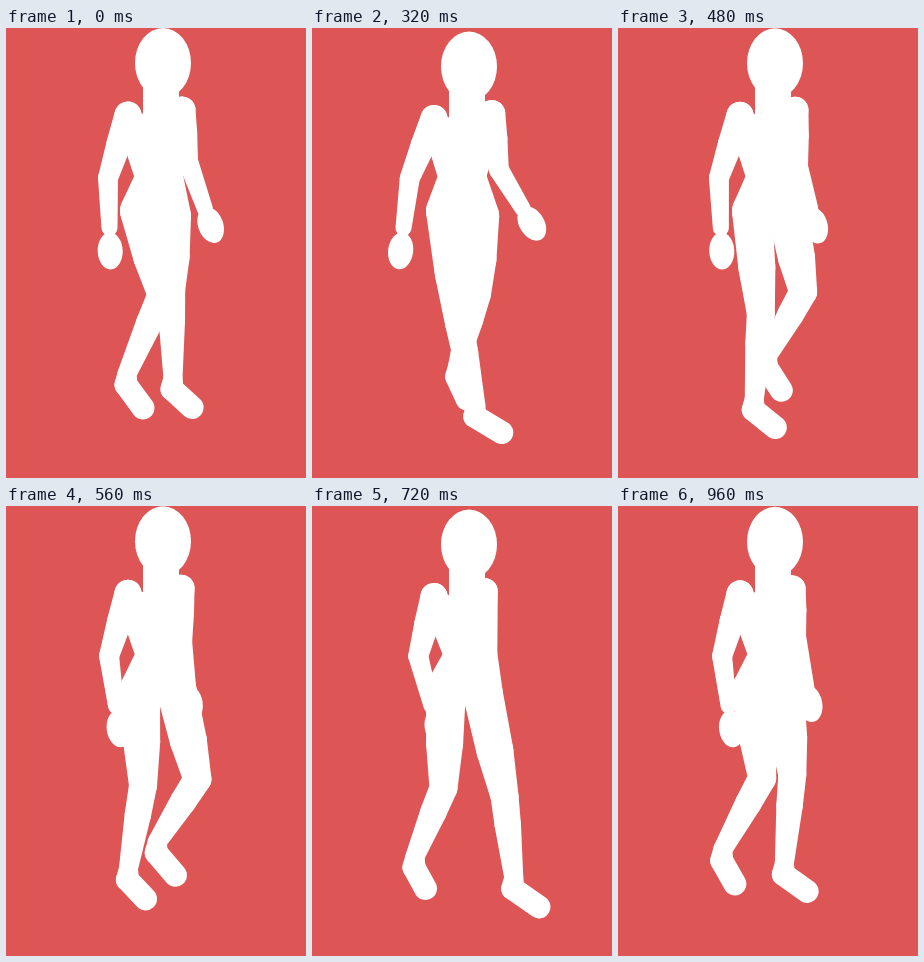
Animation of 300x450 px, one loop 1.04 s. Source, as an HTML page with a canvas:

```html
<!DOCTYPE html>
<html lang="en">
<head>
<meta charset="utf-8">
<title>Walk cycle</title>
<style>
  html, body { margin: 0; width: 100%; height: 100%; overflow: hidden; background: #de5555; }
  canvas { display: block; width: 300px; height: 450px; }
</style>
</head>
<body>
<canvas id="stage" width="300" height="450"></canvas>
<script>
const LOOP = 1040, STEP = 80;
const ctx = document.getElementById('stage').getContext('2d');

const mix = (a, b, u) => a.map((v, i) => v + (b[i] - v) * u);
const along = ([x, y], angle, len) => [x + len * Math.cos(angle), y + len * Math.sin(angle)];
const angleTo = (a, b) => Math.atan2(b[1] - a[1], b[0] - a[0]);

// Every joint sways around a mean place; waves are cosine and sine parts per harmonic.
// L and R are sides of the screen.
function poseAt(phase) {
  const wave = (mean, ...parts) => parts.reduce((sum, amp, i) => {
    const turn = phase * (1 + (i >> 1));
    return sum + amp * (i % 2 ? Math.sin(turn) : Math.cos(turn));
  }, mean);
  const bob = wave(0, 0, 0, -2);

  const left = {
    shoulder: [122, 89 + bob],
    elbow: [wave(102, 0, -4.5), 150],
    wrist: [wave(105, -1.5, -15), 200],
    waist: [wave(141, 0, -3), 149],
    hip: [134, 183],
    knee: [wave(144.5, 7.7, 11, 3.3, 2.3, 0, 2), wave(281, -7.5, 4.3, -6.8, -4.3)],
    heel: [wave(128, -4, 34.6, -4, 2.9), wave(369.5, -10.5, 13, -2.2, -2)]
  };
  const right = {
    shoulder: [wave(176, 0, 4), 84 + bob],
    elbow: [wave(180, 2, 8), wave(135, -2, 6)],
    wrist: [wave(193, 6, 21.5), 181],
    waist: [wave(167, -2, -6), 148],
    hip: [wave(168, -3, -2), 188],
    knee: [wave(175.6, -11.8, -15.7, 1.4, -1.3), wave(274.3, 0, -9.2, -9.3, 5.2, -3.3)],
    heel: [wave(162, 1.7, -26, -5.7, 0, 8, 8), wave(360, 8, -17, -8.9, 1, 2, 1)]
  };

  // The feet swing half a cycle apart; hands and ankles follow their limbs.
  [left, right].forEach((side, i) => {
    const turn = phase + i * Math.PI;
    const tilt = 0.84 - 0.3 * Math.cos(turn - 1.9);
    side.toe = along(side.heel, tilt, 28 + 4 * Math.cos(turn - 1.4));
    side.ankle = [side.heel[0] + 1, side.heel[1] - 11];
    side.bend = angleTo(side.elbow, side.wrist);
    side.hand = along(side.wrist, side.bend, i ? 17 : 23);
    side.arm = mix(side.shoulder, side.elbow, 0.45);
    side.thigh = mix(side.hip, side.knee, 0.55);
    side.calf = mix(side.knee, side.ankle, 0.35);
  });
  return { bob, left, right };
}

const radius = { shoulder: 13.5, arm: 12.5, elbow: 10, wrist: 8, waist: 12, hip: 20,
                 thigh: 18.5, knee: 14, calf: 13.2, ankle: 9.5, heel: 11.5, toe: 11.5 };

function taper([x1, y1], r1, [x2, y2], r2) {
  const dir = Math.atan2(y2 - y1, x2 - x1);
  const len = Math.hypot(x2 - x1, y2 - y1);
  const a = Math.acos(Math.max(-1, Math.min(1, (r1 - r2) / len)));
  ctx.beginPath();
  ctx.arc(x1, y1, r1, dir + a, dir - a + 2 * Math.PI);
  ctx.arc(x2, y2, r2, dir - a, dir + a);
  ctx.fill();
}

function oval([x, y], rx, ry, turn) {
  ctx.beginPath();
  ctx.ellipse(x, y, rx, ry, turn, 0, 7);
  ctx.fill();
}

function chain(side, ...names) {
  for (let i = 1; i < names.length; i++) {
    const a = names[i - 1], b = names[i];
    taper(side[a], radius[a], side[b], radius[b]);
  }
}

function draw(time) {
  const { bob, left, right } = poseAt(2 * Math.PI * time / LOOP);
  ctx.fillStyle = '#de5555';
  ctx.fillRect(0, 0, 300, 450);
  ctx.fillStyle = '#fff';

  oval([157, 37 + bob], 28, 35, 0);
  taper([155, 55], 18, [155, 87 + bob], 18);

  ctx.beginPath();
  for (const joint of ['shoulder', 'waist', 'hip']) ctx.lineTo(...left[joint]);
  for (const joint of ['hip', 'waist', 'shoulder']) ctx.lineTo(...right[joint]);
  ctx.fill();

  for (const side of [left, right]) {
    chain(side, 'shoulder', 'waist', 'hip', 'thigh', 'knee', 'calf', 'ankle', 'heel', 'toe');
    chain(side, 'shoulder', 'arm', 'elbow', 'wrist');
    oval(side.hand, 18.5, 12.5, side.bend);
  }
}

function tick() {
  draw(Math.floor(performance.now() % LOOP / STEP) * STEP);
  requestAnimationFrame(tick);
}
tick();
</script>
</body>
</html>
```
